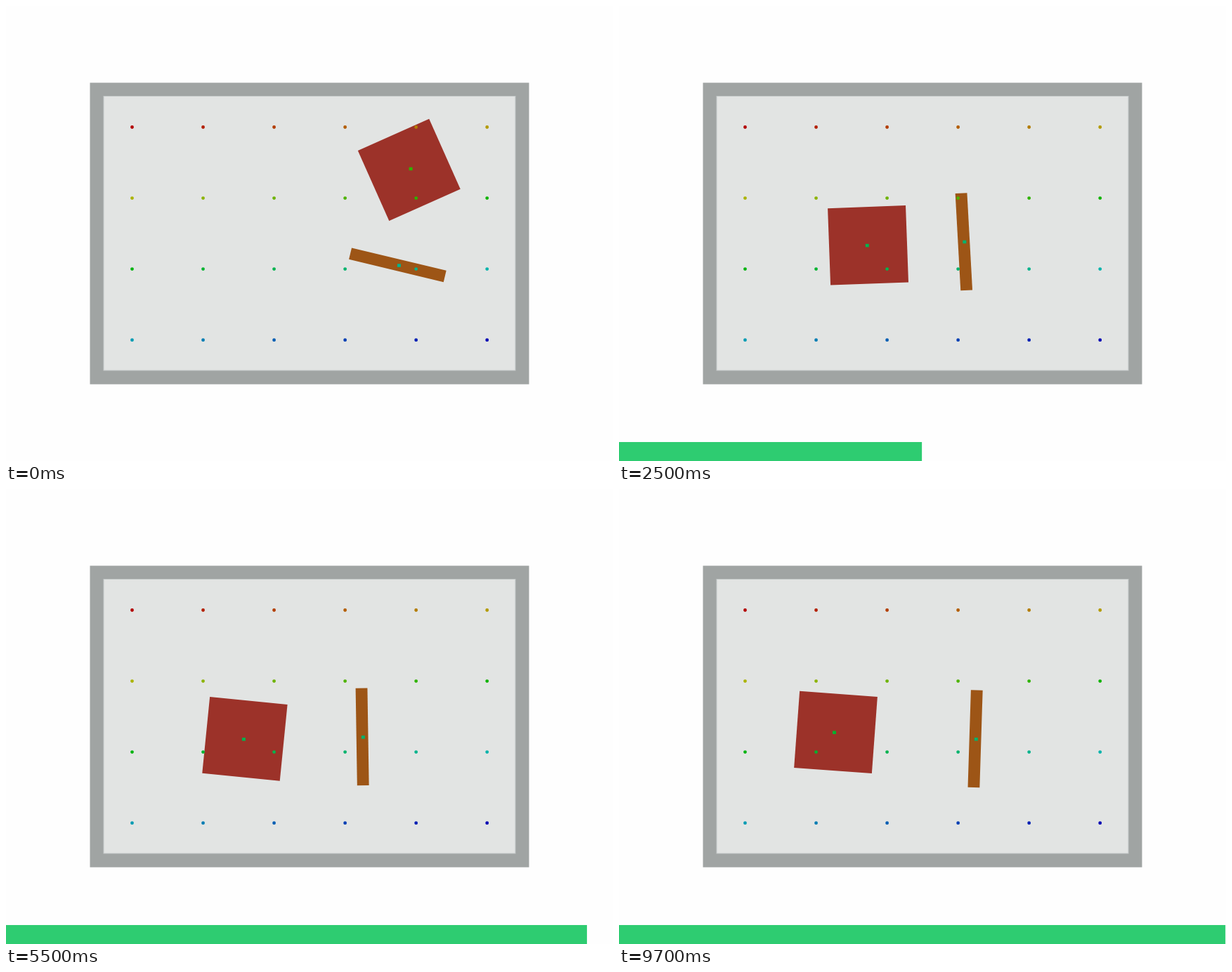
An HTML page with a canvas for the animation above (9800 ms loop, 864 px wide and 648 px high).

```html
<!DOCTYPE html>
<html lang="en">
<head>
<meta charset="utf-8">
<title>Block and stick</title>
<style>
  html, body { margin: 0; width: 100%; height: 100%; overflow: hidden; background: #fefefe; }
  canvas { display: block; }
</style>
</head>
<body>
<canvas id="stage" width="864" height="648"></canvas>
<script>
const W = 864, H = 648, STEP = 100, STEPS = 98, DARK_STEP = 65;
const ctx = document.getElementById('stage').getContext('2d');
const grid = { x: 179.5, y: 172.5, gap: 101.05, cols: 6, rows: 4 };

const pose = (step, x, y, angle) => ({ step, x, y, angle });

const block = {
  w: 111, h: 109.4, color: '#9c3229',
  path: [
    pose(0, 573.8, 233.4, -24), pose(16, 202.3, 361.4, -24), pose(34, 506.8, 320.2, 19.8),
    pose(47, 338.6, 361.4, 7), pose(81, 344.3, 338, 1.5), pose(97, 308.5, 346.4, 4.2)
  ]
};
const stick = {
  w: 138.5, h: 16.8, color: '#9d5516',
  path: [
    pose(0, 557.4, 368.8, 13.5), pose(16, 622, 334, 63.8), pose(34, 359.7, 337.5, 109.9),
    pose(47, 508.5, 352.2, 89.3), pose(81, 502.7, 355.5, 88.4), pose(97, 507.1, 355.8, 91.8)
  ]
};

const mix = (a, b, p) => a + (b - a) * p;

function poseAt(path, step) {
  const next = Math.max(1, path.findIndex(p => p.step >= step));
  const a = path[next - 1], b = path[next];
  const p = (step - a.step) / (b.step - a.step);
  return pose(step, mix(a.x, b.x, p), mix(a.y, b.y, p), mix(a.angle, b.angle, p));
}

function rect(x, y, w, h, color) {
  ctx.fillStyle = color;
  ctx.fillRect(x, y, w, h);
}

function drawBody({ w, h, color }, { x, y, angle }) {
  ctx.save();
  ctx.translate(x, y);
  ctx.rotate(angle * Math.PI / 180);
  rect(-w / 2, -h / 2, w, h, color);
  ctx.restore();
}

const hue = (col, row) =>
  `hsl(${(row * grid.cols + col) * 240 / 23}, 100%, 35%)`;

function drawGrid() {
  for (let row = 0; row < grid.rows; row++) {
    for (let col = 0; col < grid.cols; col++) {
      ctx.fillStyle = hue(col, row);
      ctx.beginPath();
      ctx.arc(grid.x + col * grid.gap, grid.y + row * grid.gap, 2.4, 0, Math.PI * 2);
      ctx.fill();
    }
  }
}

// The marker floats above its body and takes the hue of the nearest grid point
function drawMarker(body) {
  const x = mix(W / 2, body.x, 1.0165);
  const y = mix(H / 2, body.y, 1.0165);
  const col = Math.round((x - grid.x) / grid.gap);
  const row = Math.round((y - grid.y) / grid.gap);
  rect(x - 2.5, y - 2.25, 5, 4.5, hue(col, row));
}

function drawRoom() {
  rect(0, 0, W, H, '#fefefe');
  rect(119.5, 109.3, 625, 429.4, '#a0a4a3');
  rect(138.5, 128, 587, 391.5, '#c3c8c8');
  rect(139.5, 129, 585, 389.5, '#e2e4e3');
}

// Twenty ticks per step at first, then one tick per step
const progress = step => (step < 48 ? step * 20 : 904 + step) / 1002;

function draw(step) {
  if (step === DARK_STEP) {
    rect(0, 0, W, H, '#000');
  } else {
    const bodies = [block, stick];
    const poses = bodies.map(body => poseAt(body.path, step));
    drawRoom();
    bodies.forEach((body, i) => drawBody(body, poses[i]));
    drawGrid();
    poses.forEach(drawMarker);
  }
  rect(0, 621, progress(step) * W, 27, '#2ecc71');
}

const start = performance.now();
let shown = -1;
function tick() {
  const step = Math.floor((performance.now() - start) / STEP) % STEPS;
  if (step !== shown) draw(shown = step);
  requestAnimationFrame(tick);
}
tick();
</script>
</body>
</html>
```
